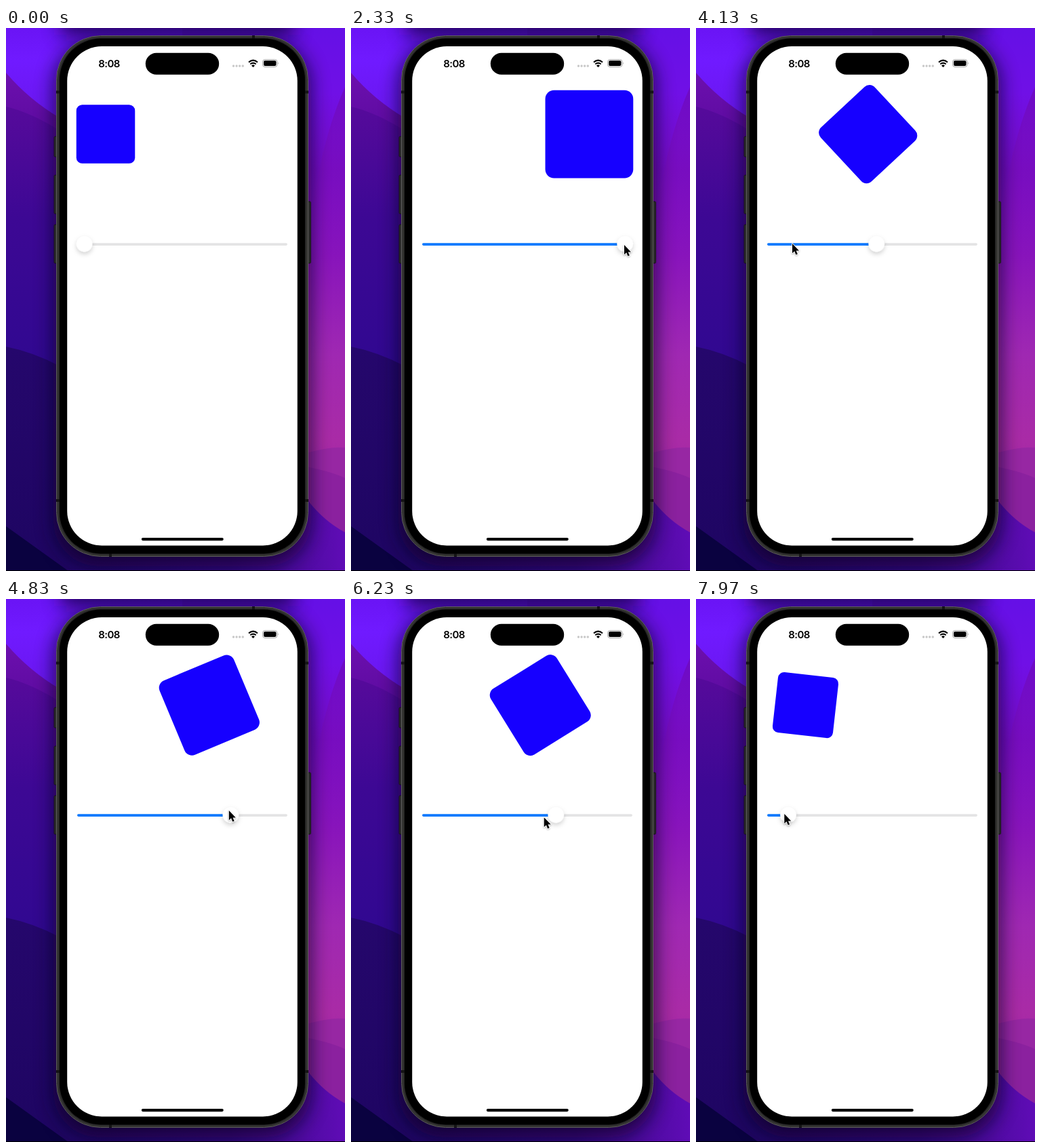
Recreate the animation shown at these times as an HTML page. Size 500 px wide and 801 px high, loop 8000 ms.

```html
<!DOCTYPE html>
<html lang="en">
<head>
<meta charset="utf-8">
<title>Slider-driven square</title>
<style>
  html, body { margin: 0; width: 100%; height: 100%; overflow: hidden; background: #32078c; }
  svg { display: block; width: 100%; height: 100%; }
  text { font: 600 15px Inter, "Liberation Sans", sans-serif; letter-spacing: -.6px; }
</style>
</head>
<body>
<svg viewBox="0 0 500 801">
  <defs>
    <linearGradient id="left" x2="0" y2="1">
      <stop offset="0" stop-color="#6a14f5"/>
      <stop offset=".06" stop-color="#701aff"/>
      <stop offset=".15" stop-color="#6a17f0"/>
    </linearGradient>
    <linearGradient id="ridge" x2="0" y2="1">
      <stop offset="0" stop-color="#6d0fae"/>
      <stop offset="1" stop-color="#560a9c"/>
    </linearGradient>
    <linearGradient id="hill" x2="0" y2="1">
      <stop offset="0" stop-color="#560a9b"/>
      <stop offset=".4" stop-color="#3d0894"/>
      <stop offset="1" stop-color="#2f0890"/>
    </linearGradient>
    <linearGradient id="deep" x2="0" y2="1">
      <stop offset="0" stop-color="#25076c"/>
      <stop offset="1" stop-color="#1e0562"/>
    </linearGradient>
    <linearGradient id="right" x2="0" y2="1">
      <stop offset="0" stop-color="#6510e6"/>
      <stop offset=".12" stop-color="#7010e6"/>
      <stop offset=".26" stop-color="#760cc4"/>
      <stop offset=".42" stop-color="#8814bb"/>
      <stop offset=".6" stop-color="#9f28b2"/>
      <stop offset=".76" stop-color="#a92ba6"/>
      <stop offset="1" stop-color="#8e1fa4"/>
    </linearGradient>
    <linearGradient id="slope" x2="0" y2="1">
      <stop offset="0" stop-color="#6d08b4" stop-opacity=".7"/>
      <stop offset="1" stop-color="#8814bb" stop-opacity="0"/>
    </linearGradient>
    <linearGradient id="base">
      <stop offset="0" stop-color="#1e0562"/>
      <stop offset=".6" stop-color="#340780"/>
      <stop offset="1" stop-color="#5f0cb6"/>
    </linearGradient>
    <filter id="soft" filterUnits="userSpaceOnUse" x="-60" y="-80" width="620" height="960">
      <feGaussianBlur stdDeviation="14"/>
    </filter>
    <filter id="lift" x="-60%" y="-60%" width="220%" height="240%">
      <feDropShadow dx="0" dy="3.5" stdDeviation="3" flood-opacity=".17"/>
    </filter>
    <filter id="tip" x="-50%" y="-50%" width="200%" height="200%">
      <feDropShadow dx="0" dy="1" stdDeviation=".8" flood-opacity=".35"/>
    </filter>
  </defs>

  <!-- wallpaper -->
  <path fill="url(#left)" d="M0 0H260V801H0Z"/>
  <path fill="url(#ridge)" d="M0 66Q34 106 80 133L150 180H0Z"/>
  <path fill="url(#hill)" d="M0 116Q38 125 80 152L150 200V520H0Z"/>
  <path fill="url(#deep)" d="M0 470Q40 478 80 499L150 540V801H0Z"/>
  <path fill="url(#right)" d="M260 0H500V801H260Z"/>
  <path fill="url(#slope)" d="M500 87Q474 145 459 225L440 330H500Z"/>
  <path fill="#9727a3" d="M400 640Q470 616 500 619V760H400Z"/>
  <path fill="#8b219f" d="M400 640Q472 650 500 664V760H400Z"/>
  <path fill="url(#base)" d="M80 740L400 660L446 698Q470 728 500 744V801H80Z"/>
  <path fill="#0a0240" d="M0 735L92 801H0Z"/>
  <rect x="80" y="-60" width="345" height="70" fill="#12023c" opacity=".8" filter="url(#soft)"/>
  <rect x="70" y="18" width="380" height="776" rx="66" fill="#080024" opacity=".7" filter="url(#soft)"/>
  <path d="M0 800H500V801H0Z"/>

  <!-- phone -->
  <g fill="#2a2a2a" stroke="#111" stroke-width=".8">
    <rect x="71" y="160" width="6" height="30" rx="1.5"/>
    <rect x="71" y="217" width="6" height="57" rx="1.5"/>
    <rect x="71" y="290" width="6" height="57" rx="1.5"/>
    <rect x="444" y="256" width="5.5" height="91" rx="1.5"/>
  </g>
  <rect x="74.5" y="11.5" width="371" height="768" rx="65" fill="#272726" stroke="#626260"/>
  <rect x="76.5" y="13.5" width="367" height="764" rx="63" fill="none" stroke="#3c3c3a" stroke-width="1.2"/>
  <path stroke="#151515" stroke-width="4" d="M74 94.5h5M441 94.5h5M74 697h5M441 697h5M365 11v5M154 775v5"/>
  <rect x="79" y="15.5" width="362" height="760" rx="61"/>
  <rect x="90.2" y="27" width="339.6" height="736.4" rx="51" fill="#fff"/>
  <rect x="205.8" y="36.7" width="108.4" height="32" rx="16"/>
  <rect x="199.8" y="752" width="121" height="4.2" rx="2.1"/>

  <!-- status bar -->
  <text x="152" y="57.6" text-anchor="middle">8:08</text>
  <path d="M335.5 56h14" stroke="#c8c8c8" stroke-width="3.4" stroke-linecap="round" stroke-dasharray="0 4.6"/>
  <g fill="none" stroke="#000" stroke-width="2.1">
    <path d="M358 50.5Q364.5 44.8 371 50.5"/>
    <path d="M360.3 53.3Q364.5 49.8 368.7 53.3"/>
  </g>
  <path d="M364.5 58L362 55.4Q364.5 53.3 367 55.4Z"/>
  <rect x="378.5" y="46.5" width="21.5" height="11" rx="3.5" fill="none" stroke="#a6a6a6"/>
  <rect x="380" y="48" width="18.5" height="8" rx="2.2"/>
  <path d="M401 50.2Q402.8 52 401 53.8Z" fill="#a6a6a6"/>

  <!-- moving parts -->
  <rect id="box" x="-43.25" y="-43.25" width="86.5" height="86.5" rx="8.6" fill="#1600ff"/>
  <rect x="105" y="317.3" width="310" height="3.6" rx="1.8" fill="#e4e4e5"/>
  <rect id="fill" x="105" y="317.3" height="3.6" rx="1.8" fill="#0a7aff"/>
  <circle id="thumb" cy="318.3" r="11.9" fill="#fff" stroke="#000" stroke-opacity=".04" stroke-width=".6" filter="url(#lift)"/>
  <path id="cursor" d="M0 0V14.2L3.2 11.3L5.4 16.5L7.9 15.4L5.7 10.4H10Z"
    stroke="#fff" stroke-width="1.6" paint-order="stroke" stroke-linejoin="round" filter="url(#tip)"/>
</svg>
<script>
const LOOP = 8000;
const $ = id => document.getElementById(id);
const clamp = u => Math.min(1, Math.max(0, u));
const swing = u => (1 - Math.cos(Math.PI * u)) / 2;
const settle = u => 1 - (1 - u) ** 1.6;

// Each stroke moves the slider to a value and the pointer to x, y;
// hold delays the pointer, which then catches up.
const strokes = [
  { from: 30, to: 670, value: 0, x: 118, y: 312, ease: swing },
  { from: 830, to: 2285, value: 1, x: 403, y: 320, ease: settle, hold: 260 },
  { from: 2570, to: 3530, value: .1, x: 142, y: 318, ease: swing },
  { from: 3670, to: 4630, value: 1, x: 402, y: 314, ease: swing, hold: 480 },
  { from: 4630, to: 5230, value: 0, x: 112, y: 306, ease: swing },
  { from: 5370, to: 7170, value: 1, x: 379, y: 331, ease: settle },
  { from: 7370, to: 8000, value: .066, x: 129, y: 317, ease: swing }
];

function pose(t) {
  const now = { value: 0, x: 512, y: 440 };
  for (const s of strokes) {
    const k = s.ease(clamp((t - s.from) / (s.to - s.from)));
    const chase = s.hold ? k * clamp((t - s.from - s.hold) / 150) : k;
    now.value += (s.value - now.value) * k;
    now.x += (s.x - now.x) * chase;
    now.y += (s.y - now.y) * chase;
  }
  return now;
}

function draw(t) {
  const { value, x, y } = pose(t);
  const thumb = 115.6 + 288.6 * value;
  $("thumb").setAttribute("cx", thumb);
  $("fill").setAttribute("width", thumb - 105);
  $("box").setAttribute("transform",
    `translate(${147 + 204.4 * value} 156.6) rotate(${90 * value}) scale(${1 + value / 2})`);
  $("cursor").setAttribute("transform", `translate(${x} ${y})`);
}

const start = performance.now();
function tick() {
  draw((performance.now() - start) % LOOP);
  requestAnimationFrame(tick);
}
tick();
</script>
</body>
</html>
```
